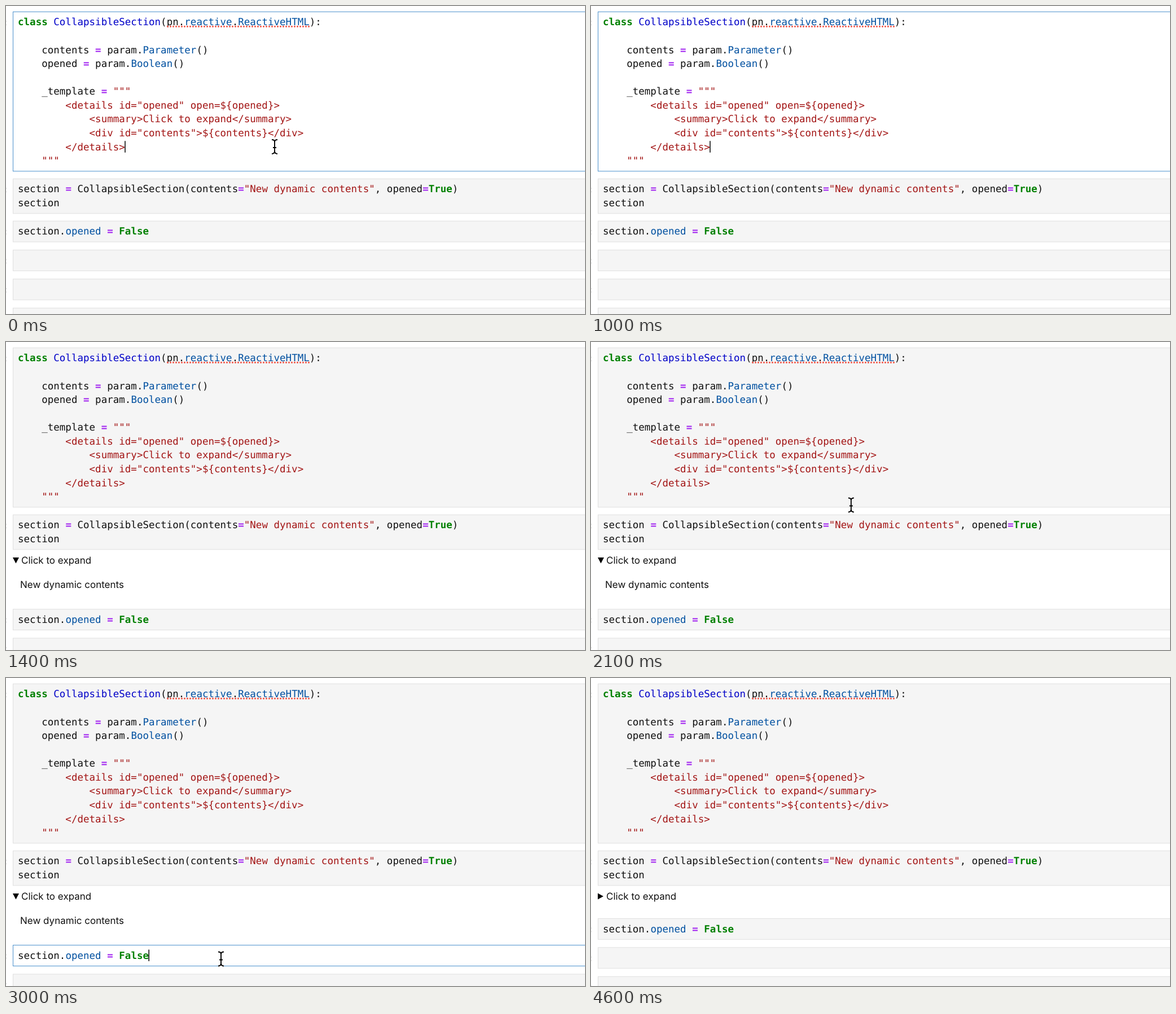
An HTML page for the animation above (4700 ms loop, 1026 by 546 pixels).

```html
<!DOCTYPE html>
<html lang="en">
<head>
<meta charset="utf-8">
<title>Collapsible section</title>
<style>
  html, body { margin: 0; width: 100%; height: 100%; overflow: hidden; background: #fff; }
  svg { display: block; width: 1026px; height: 546px; }
  text { white-space: pre; text-rendering: geometricPrecision; fill: #111; }
  .code { font: 17.52px "DejaVu Sans Mono", monospace; }
  .output { font: 17px Inter, sans-serif; }
  .k { fill: #008000; font-weight: bold; }
  .d { fill: #0000c8; }
  .p { fill: #0050a0; }
  .o { fill: #a020f0; font-weight: bold; }
  .s { fill: #a31515; }
  .cell rect { fill: #f5f5f5; stroke: #e0e0e0; }
  .cell.editing rect { fill: #fff; stroke: #4a90cc; }
  .cell .prompt { stroke: #ddd; }
  .caret { stroke: #000; stroke-width: 1.5; }
</style>
</head>
<body>
<svg id="stage" viewBox="0 0 1026 546"></svg>
<script>
const LOOP = 4700, LINE = 24.56, CHAR = 10.547, LEFT = 21;
const stage = document.getElementById('stage');

// Inline markup: {style|text}; styles are k, d, p, o and s.
const definition = [
  '{k|class} {d|CollapsibleSection}(pn.{p|reactive}.{p|ReactiveHTML}):',
  '',
  '    contents {o|=} param.{p|Parameter}()',
  '    opened {o|=} param.{p|Boolean}()',
  '',
  '    _template {o|=} {s|"""}',
  '{s|        <details id="opened" open=$[opened]>}',
  '{s|            <summary>Click to expand</summary>}',
  '{s|            <div id="contents">$[contents]</div>}',
  '{s|        </details>}',
  '{s|    """}'
];
const usage = [
  'section {o|=} CollapsibleSection(contents{o|=}{s|"New dynamic contents"}, opened{o|=}{k|True})',
  'section'
];
const assignment = ['section.{p|opened} {o|=} {k|False}'];

const escapeText = s => s.replace(/</g, '&lt;').replace(/>/g, '&gt;');

// Square brackets stand for braces inside the template string.
const highlight = line => escapeText(line)
  .replace(/\{(\w)\|([^}]*)\}/g, '<tspan class="$1">$2</tspan>')
  .replace(/\$\[(\w+)\]/g, '$${$1}');

function cell(id, lines, extra = '') {
  const height = lines.length * LINE + 12.4;
  const text = lines.map((line, i) =>
    `<text class="code" x="${LEFT}" y="${24.2 + i * LINE}">${highlight(line)}</text>`).join('');
  return `<g class="cell" id="${id}"><rect x="12.5" width="1030" height="${height}"/>
    <path class="prompt" d="M.5 16v2m0 4v2"/>${text}${extra}</g>`;
}

const caret = (column, row) => {
  const x = LEFT + column * CHAR + .2, y = 8 + row * LINE;
  return `<path class="caret" d="M${x} ${y}v20.5"/>`;
};

const spelling = `<path d="M286.5 26H538" stroke="#f0594c" stroke-width="3.2"
  stroke-linecap="round" stroke-dasharray="0 5"/>`;
const beam = 'M-5-12Q0-12 0-8Q0-12 5-12M0-9V9M-5 13Q0 13 0 8Q0 13 5 13M-3 2H3';

stage.innerHTML =
  cell('definition', definition, spelling + caret(18, 9)) +
  cell('usage', usage) +
  `<path id="arrow"/>
   <text class="output" x="27" y="393">Click to expand</text>
   <text class="output" id="contents" x="25" y="435.7">New dynamic contents</text>` +
  '<g id="rest">' + cell('assignment', assignment, caret(22, 0)) +
  [1, 2, 3].map(i => cell('empty' + i, [''])).join('') + '</g>' +
  `<g id="pointer" fill="none"><path d="${beam}" stroke="#fff" stroke-width="4"/>
   <path d="${beam}" stroke="#000" stroke-width="1.9"/></g>`;

const get = id => document.getElementById(id);
const show = (element, on) => element.style.display = on ? '' : 'none';
const place = (element, x, y) => element.setAttribute('transform', `translate(${x} ${y})`);
const within = (t, from, to) => t >= from && t < to;

place(get('definition'), 0, 10.3);
place(get('usage'), 0, 306.3);
['assignment', 'empty1', 'empty2', 'empty3'].forEach((id, i) => place(get(id), 0, i * 51.4));
const outputs = stage.querySelectorAll('.output');

function setEditing(id, editing, caretOn) {
  get(id).classList.toggle('editing', editing);
  show(get(id).querySelector('.caret'), editing && caretOn);
}

function movePointer(t) {
  show(get('pointer'), t < 800 || within(t, 2100, 3200));
  const u = Math.min(1, Math.max(0, (t - 2000) / 400));
  const ease = u * u * (3 - 2 * u);
  place(get('pointer'), 476 - 95 * ease, 249 + 248.5 * ease);
}

function draw(now) {
  const t = now % LOOP;
  const run = t >= 1300, open = within(t, 1300, 3300);

  setEditing('definition', t < 1100, !within(t, 300, 800));
  setEditing('assignment', within(t, 2700, 3300), t < 3230);

  outputs.forEach(element => show(element, run));
  show(get('contents'), open);
  show(get('arrow'), run);
  get('arrow').setAttribute('d', open ? 'M12 382H23L17.5 392.5Z' : 'M12 381.5V392.5L22 387Z');
  place(get('rest'), 0, !run ? 381.2 : open ? 473.6 : 426.4);

  movePointer(t);
  requestAnimationFrame(draw);
}
requestAnimationFrame(draw);
</script>
</body>
</html>
```
